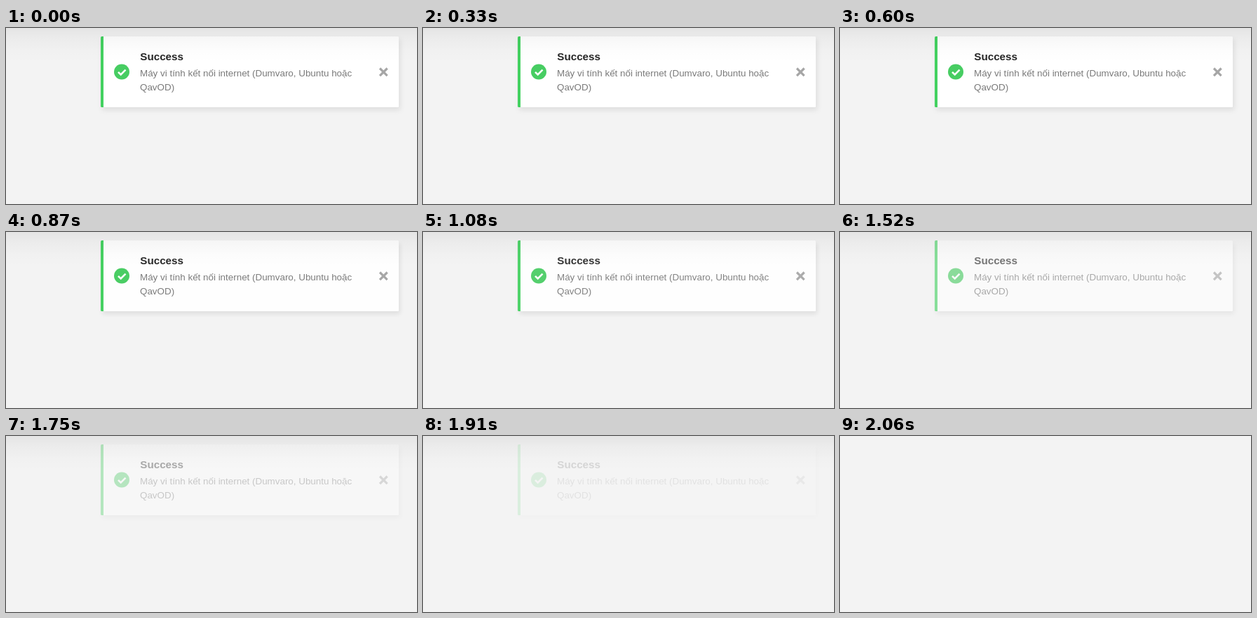
Animation of 586x251 px, one loop 3360 ms. Source, as an HTML page:

```html
<!DOCTYPE html>
<html lang="vi">
<head>
<meta charset="utf-8">
<title>Success toast</title>
<style>
  html, body { margin: 0; width: 100%; height: 100%; overflow: hidden; background: #f3f3f3; }
  svg { display: block; width: 586px; height: 251px; }
  text { font-family: "Liberation Sans", Arial, sans-serif; }
  .title { font-size: 15.2px; font-weight: 700; fill: #252525; }
  .body { font-size: 13.4px; fill: #7a7a7a; }
</style>
</head>
<body>
<svg viewBox="0 0 586 251">
  <defs>
    <linearGradient id="shade" x1="0" y1="0" x2="0" y2="1">
      <stop offset="0" stop-opacity=".06"/>
      <stop offset=".3" stop-opacity=".03"/>
      <stop offset=".65" stop-opacity=".009"/>
      <stop offset="1" stop-opacity="0"/>
    </linearGradient>
    <filter id="shadow" x="-10%" y="-20%" width="120%" height="150%">
      <feDropShadow dx="2" dy="4" stdDeviation="3.5" flood-opacity=".09"/>
    </filter>
  </defs>
  <rect width="586" height="251" fill="#f3f3f3"/>
  <g id="toast">
    <rect x="135" y="12" width="425" height="101" rx="1.5" fill="#fff" filter="url(#shadow)"/>
    <path d="M139 12V113H136.5Q135 113 135 111.5V13.5Q135 12 136.5 12Z" fill="#43d160"/>
    <circle cx="165" cy="62.5" r="11" fill="#47cd62"/>
    <path d="M160 62.8l3.7 3.7 6.8-6.8" fill="none" stroke="#fff" stroke-width="2.6"/>
    <text class="title" x="191.3" y="46.3">Success</text>
    <text class="body" x="191" y="69">Máy vi tính kết nối internet (Dumvaro, Ubuntu hoặc</text>
    <text class="body" x="191" y="89">QavOD)</text>
    <path d="M533 57.5l10.6 10.6M543.6 57.5l-10.6 10.6" stroke="#a6a6a6" stroke-width="3.2"/>
  </g>
  <rect id="topShade" width="586" height="50" fill="url(#shade)"/>
</svg>
<script>
  const LOOP = 3360, FADE_START = 670, FADE_END = 2000, CLEAR = 2060;
  // The fade advances in uneven ticks.
  const ticks = [0, 670, 770, 870, 960, 1070, 1180, 1240, 1370, 1450, 1520, 1660, 1750, 1820, 1910, CLEAR];
  const toast = document.getElementById("toast");
  const topShade = document.getElementById("topShade");

  function render(time) {
    const tick = ticks.filter(t => t <= time).pop();
    const progress = Math.min(1, Math.max(0, (tick - FADE_START) / (FADE_END - FADE_START)));
    toast.setAttribute("opacity", 1 - progress ** 2.1);
    topShade.setAttribute("opacity", tick < CLEAR ? 1 : 0);
  }

  const start = performance.now();
  function loop() {
    render((performance.now() - start) % LOOP);
    requestAnimationFrame(loop);
  }
  loop();
</script>
</body>
</html>
```
